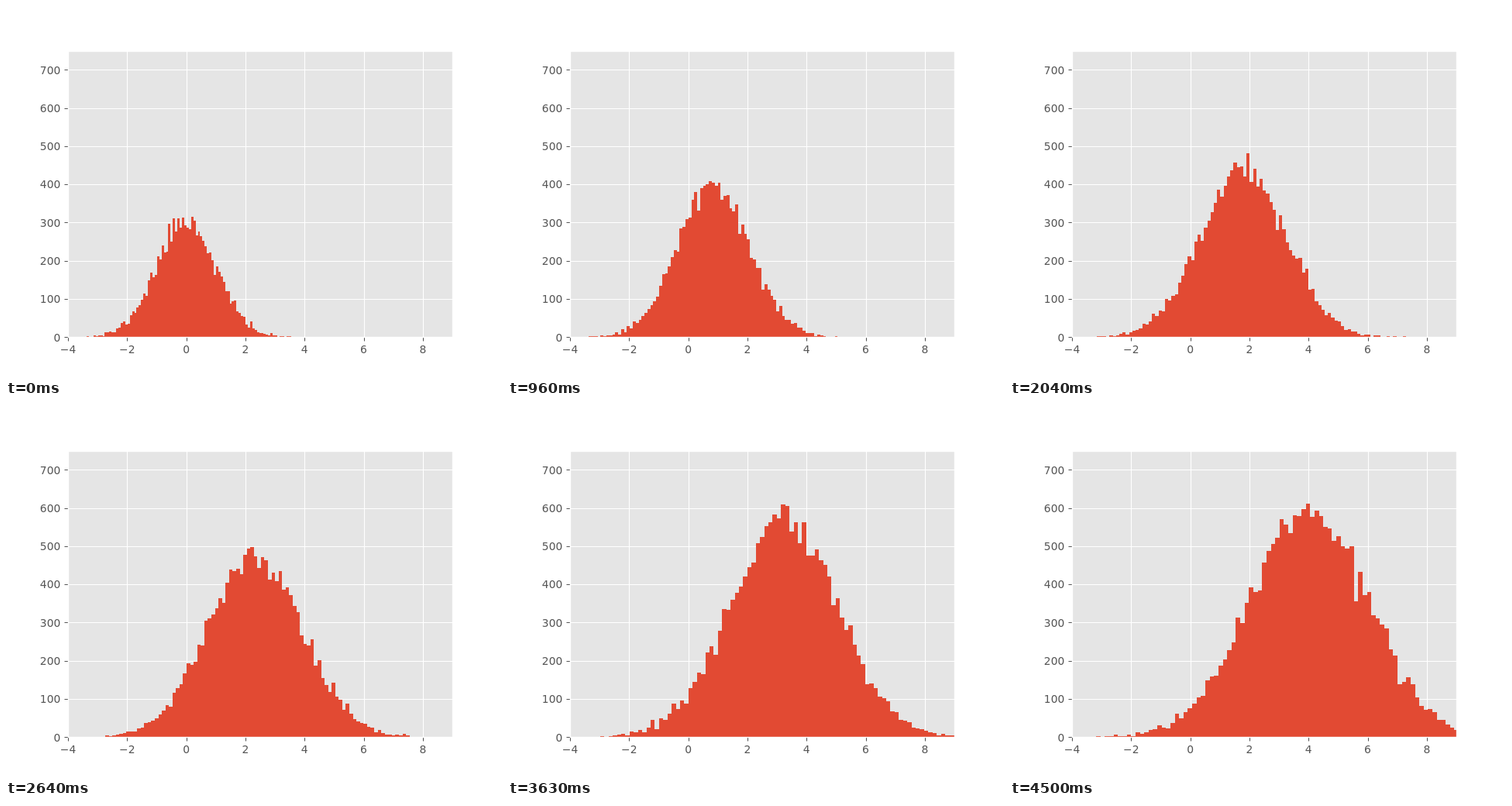
Animation of 640x480 px, one loop 4.53 s. Source, as an HTML page:

```html
<!DOCTYPE html>
<html lang="en">
<head>
<meta charset="utf-8">
<title>Drifting histogram</title>
<style>
  html, body { margin: 0; width: 100%; height: 100%; overflow: hidden; background: #fff; }
  svg { display: block; width: 640px; height: 480px; }
  text { font: 13.89px "DejaVu Sans", sans-serif; fill: #555; }
</style>
</head>
<body>
<svg viewBox="0 0 640 480">
  <defs><clipPath id="area"><rect x="80" y="58" width="496" height="369"/></clipPath></defs>
  <rect x="80" y="58" width="496" height="369" fill="#e5e5e5"/>
  <path id="grid" stroke="#fff" stroke-width="1.11" fill="none"/>
  <path id="ticks" stroke="#555" stroke-width="1.11" fill="none"/>
  <path id="bars" fill="#e24a33" shape-rendering="crispEdges" clip-path="url(#area)"/>
  <rect x="80.5" y="58.5" width="496" height="369" fill="none" stroke="#fff" stroke-width="1.39"/>
  <g id="labels"></g>
</svg>
<script>
const LOOP = 4530, STEP = 30, LAST = 149, BINS = 100;
const LEFT = 80, BASE = 427.2, UNIT = 496 / 13, PER_COUNT = 0.4926;
const $ = id => document.getElementById(id);
const toX = v => LEFT + (v + 4) * UNIT;
const toY = n => BASE - n * PER_COUNT;

function seeded(seed) {
  return () => {
    seed = (seed + 0x6d2b79f5) | 0;
    let r = Math.imul(seed ^ (seed >>> 15), 1 | seed);
    r = (r + Math.imul(r ^ (r >>> 7), 61 | r)) ^ r;
    return (((r ^ (r >>> 14)) >>> 0) + 0.5) / 4294967296;
  };
}

function drawAxes() {
  let grid = "", ticks = "", labels = "";
  const name = v => String(v).replace("-", "\u2212");
  for (let v = -4; v <= 8; v += 2) {
    const x = Math.round(toX(v)) + 0.5;
    grid += `M${x} 58V427`;
    ticks += `M${x} 427V432.5`;
    labels += `<text x="${toX(v)}" y="448" text-anchor="middle">${name(v)}</text>`;
  }
  for (let n = 0; n <= 700; n += 100) {
    const y = Math.round(toY(n)) + 0.5;
    grid += `M80 ${y}H576`;
    ticks += `M75.5 ${y}H80`;
    labels += `<text x="70.3" y="${Math.round(toY(n) + 5.3)}" text-anchor="end">${n}</text>`;
  }
  $("grid").setAttribute("d", grid);
  $("ticks").setAttribute("d", ticks);
  $("labels").innerHTML = labels;
}

// Each step is a fresh normal sample; its mean, spread and size grow steadily.
function drawBars(step) {
  const rand = seeded(step * 7919 + 11);
  const gauss = () => Math.sqrt(-2 * Math.log(rand())) * Math.cos(2 * Math.PI * rand());
  // Distance of the outermost sample from the mean, in standard deviations.
  const extreme = () => 3.73 - 0.25 * Math.log(-Math.log(rand()));
  const p = step / LAST;
  const mid = toX(4 * p), sigma = (1 + p) * UNIT, size = 10000 * (1 + p);
  const low = mid - sigma * extreme(), high = mid + sigma * extreme();
  const w = (high - low) / BINS;
  const edge = i => Math.round(low + i * w);
  const peak = size * w / sigma / Math.sqrt(2 * Math.PI);
  let d = `M${edge(0)} 427`;
  for (let i = 0; i < BINS; i++) {
    const z = (low + (i + 0.5) * w - mid) / sigma;
    const mean = peak * Math.exp(-z * z / 2);
    const count = Math.max(0, Math.round(mean + Math.sqrt(mean) * gauss()));
    d += `V${Math.round(toY(count))}H${edge(i + 1)}`;
  }
  $("bars").setAttribute("d", d + "V427Z");
}

let shown = -1;
function render(now) {
  const step = Math.max(0, Math.floor((now % LOOP) / STEP) - 1);
  if (step !== shown) drawBars(shown = step);
}

function tick(now) {
  render(now);
  requestAnimationFrame(tick);
}

drawAxes();
render(0);
requestAnimationFrame(tick);
</script>
</body>
</html>
```
